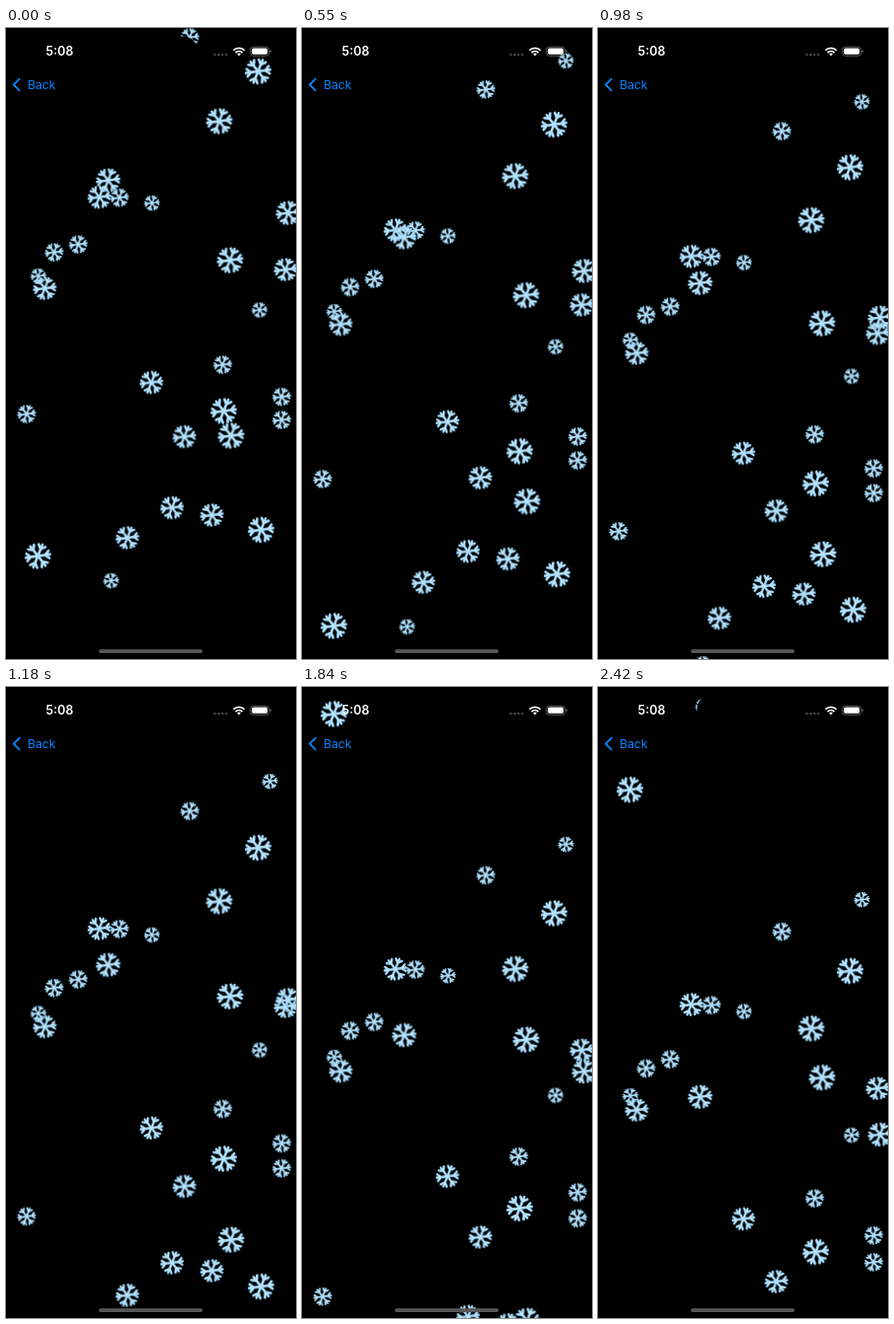
An HTML page that plays this animation: 295 px wide and 640 px high, repeating every 2.44 s.

```html
<!DOCTYPE html>
<html lang="en">
<head>
<meta charset="utf-8">
<title>Snowfall</title>
<style>
  html, body { margin: 0; width: 100%; height: 100%; overflow: hidden; background: #000; }
  svg { display: block; width: 295px; height: 640px; }
  text { font-family: Inter, "Noto Sans", sans-serif; }
</style>
</head>
<body>
<svg viewBox="0 0 295 640">
  <defs>
    <path id="arm" d="M0 0V-46M-14 -42L0 -27L14 -42"/>
    <g id="arms"></g>
    <g id="flake" fill="none" stroke-linecap="round" stroke-linejoin="round">
      <use href="#arms" stroke="#5595c4" stroke-width="10"/>
      <use href="#arms" stroke="#b6e2f8" stroke-width="8" transform="translate(-.6 -.8)"/>
    </g>
  </defs>

  <g id="snow"></g>

  <!-- camera cutout -->
  <rect x="100.8" y="8.5" width="93.6" height="27.6" rx="13.8"/>

  <g fill="#fff">
    <text x="40.5" y="28.2" font-size="12.5" font-weight="600">5:08</text>
    <path d="M212.4 27H224.2" stroke="#5a5a5c" stroke-width="2.2" stroke-linecap="round" stroke-dasharray="0 3.9"/>
    <g fill="none" stroke="#fff" stroke-width="1.8">
      <path d="M231.4 22.6a8 8 0 0 1 11.2 0"/>
      <path d="M233.5 25a5 5 0 0 1 7 0"/>
    </g>
    <path d="M237 28.3l-1.9-1.9a2.7 2.7 0 0 1 3.8 0z"/>
    <rect x="248.6" y="19.2" width="18.8" height="9" rx="2.9" fill="none" stroke="#777" stroke-width=".8"/>
    <rect x="250" y="20.6" width="16" height="6.2" rx="1.7"/>
    <path d="M268.7 22.3q1.2 .5 1.2 1.4t-1.2 1.4z" fill="#888"/>
  </g>

  <path d="M13.7 51.6L7.8 57.5L13.7 63.4" fill="none" stroke="#0a84ff" stroke-width="1.8" stroke-linecap="round" stroke-linejoin="round"/>
  <text x="22" y="62" font-size="12.3" letter-spacing="-.1" fill="#0a84ff">Back</text>

  <rect x="94.5" y="630.2" width="105.5" height="3.8" rx="1.9" fill="#585858"/>
</svg>

<script>
const LOOP = 2440, STEP = 112;
const KEYS = [0, 320, 750, 1180, 1420, 1840, 2420];
const WRAP = 752;   // a flake leaving the bottom re-enters this far above
const TILT = 22;
const SLOPE = 64.5; // extra speed per 1000 px of starting height

// Start points [x, y] by flake diameter; speed in px per second at y = 0
const near = {
  speed: 98,
  16: [[268.5, -19]],
  19: [[187, 9], [21, 391]],
  25: [[104, 154], [287, 187]],
  27: [[256.5, 43.5], [217, 94], [229, 413], [32.5, 535]]
};
const far = {
  speed: 51.2,
  16: [[148.5, 177], [33, 251], [258, 285.5], [107, 560]],
  19: [[115.5, 171.5], [73.5, 219], [49, 227], [220.5, 341], [280.5, 373.5], [280.5, 397]],
  24: [[95, 171], [284.5, 244.5], [39.5, 263.5], [148, 359], [181.5, 414],
       [169, 486], [209.5, 493.5], [123.5, 516.5]],
  27: [[228, 235], [221.5, 388], [259.5, 508.5]]
};

function add(parent, tag, attrs = {}) {
  const el = document.createElementNS("http://www.w3.org/2000/svg", tag);
  for (const name in attrs) el.setAttribute(name, attrs[name]);
  return parent.appendChild(el);
}

function drop(x, y, size, speed) {
  const flake = add(document.getElementById("snow"), "g");
  for (const shift of [0, -WRAP]) {
    add(flake, "use", { href: "#flake", transform: `translate(0 ${shift}) scale(${size / 100})` });
  }
  const pose = t => `translate(${x}px, ${y + 0.6 + speed * t / 1000}px)`;
  const frames = KEYS.map((t, i) => {
    const span = (KEYS[i + 1] ?? LOOP) - t;
    const count = Math.max(1, Math.round(span / STEP));
    return { offset: t / LOOP, transform: pose(t), easing: `steps(${count}, end)` };
  });
  frames.push({ offset: 1, transform: pose(KEYS.at(-1)) });
  flake.animate(frames, { duration: LOOP, iterations: Infinity });
}

for (let i = 0; i < 6; i++) {
  add(document.getElementById("arms"), "use", { href: "#arm", transform: `rotate(${TILT + 60 * i})` });
}

for (const { speed, ...sizes } of [far, near]) {
  for (const size in sizes) {
    for (const [x, y] of sizes[size]) drop(x, y, size, speed + SLOPE * y / 1000);
  }
}
</script>
</body>
</html>
```
